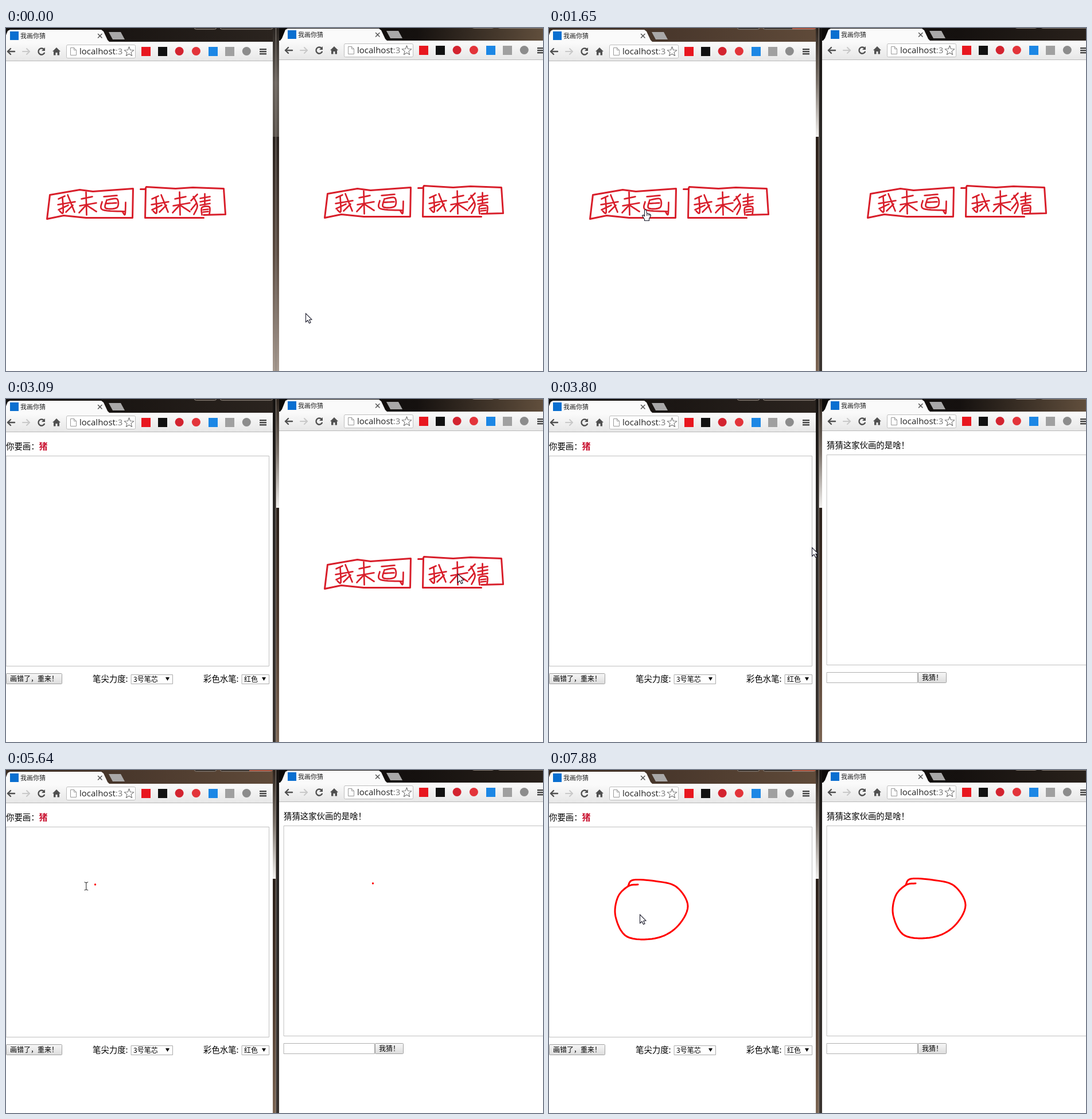
Animation, 936 px wide and 599 px high, one loop 8000 ms. Source, as an HTML page with a canvas:

```html
<!DOCTYPE html>
<html lang="zh">
<head>
<meta charset="utf-8">
<style>
html, body { margin: 0; width: 100%; height: 100%; overflow: hidden; background: #fff; }
canvas { display: block; }
</style>
</head>
<body>
<canvas id="stage" width="936" height="599"></canvas>
<script>
const ctx = document.getElementById('stage').getContext('2d');
const CJK = '"Noto Sans CJK SC", "Noto Sans CJK", sans-serif';
const SANS = '"Open Sans", "Noto Sans", sans-serif';
const LOOP = 8000, STEP = 137;
const INK = '#505050', PALE = '#c9c9c9', PEN = '#d81e2a';

// Basic shapes

function rect(x, y, w, h, fill) { ctx.fillStyle = fill; ctx.fillRect(x, y, w, h); }

function disc(x, y, r, fill) {
  ctx.beginPath(); ctx.arc(x, y, r, 0, 7);
  ctx.fillStyle = fill; ctx.fill();
}

function box(x, y, w, h, fill, stroke, r = 0) {
  ctx.beginPath(); ctx.roundRect(x + .5, y + .5, w, h, r);
  ctx.fillStyle = fill; ctx.fill();
  ctx.strokeStyle = stroke; ctx.lineWidth = 1; ctx.stroke();
}

function trace(points) {
  ctx.beginPath();
  points.forEach(([x, y]) => ctx.lineTo(x, y));
}

function poly(points, fill) { trace(points); ctx.fillStyle = fill; ctx.fill(); }

function line(points, color, width) {
  trace(points);
  ctx.strokeStyle = color; ctx.lineWidth = width;
  ctx.lineCap = ctx.lineJoin = 'round';
  ctx.stroke();
}

function text(s, x, y, size = 14.4, color = '#000', weight = '', family = CJK) {
  ctx.font = `${weight} ${size}px ${family}`;
  ctx.fillStyle = color;
  ctx.fillText(s, x, y);
}

function fade(x0, y0, x1, y1, ...colors) {
  const g = ctx.createLinearGradient(x0, y0, x1, y1);
  colors.forEach((c, i) => g.addColorStop(i / (colors.length - 1), c));
  return g;
}

// Curves

const points = s => s.split(' ').map(p => p.split(',').map(Number));
const dist = (a, b) => Math.hypot(b[0] - a[0], b[1] - a[1]);

// Catmull-Rom curve through a few key points.
function spline(keys, n = 8) {
  const at = i => keys[Math.max(0, Math.min(keys.length - 1, i))];
  const out = [keys[0]];
  for (let i = 0; i < keys.length - 1; i++) {
    for (let k = 1; k <= n; k++) {
      const u = k / n;
      out.push([0, 1].map(c => {
        const [a, b, d, e] = [-1, 0, 1, 2].map(j => at(i + j)[c]);
        return b + u * ((d - a) + u * ((2 * a - 5 * b + 4 * d - e) + u * (3 * b - a - 3 * d + e))) / 2;
      }));
    }
  }
  return out;
}

function partial(path, length) {
  const out = [path[0]];
  for (let i = 1; i < path.length && length > 0; i++) {
    const a = path[i - 1], b = path[i], d = dist(a, b), f = Math.min(1, length / d);
    out.push([a[0] + (b[0] - a[0]) * f, a[1] + (b[1] - a[1]) * f]);
    length -= d;
  }
  return out;
}

// Hand-lettered buttons: strokes separated by "|".
const strokes = s => s.split('|').map(k => spline(points(k)));
const outlines = [
  '76,291 71,333 100,327 139,331 220,331 221,280 151,285 128,282 76,291',
  '234,281 242,281 244,277 295,280 325,278 379,280 382,325 344,326',
  '344,331 242,331 243,280'
].map(points);
const wo = strokes('102,293 91,298|90,308 120,303|98,296 99,322 93,319|91,317 108,309|107,291 119,321|116,309 104,321');
const lai = strokes('131,298 150,294|128,310 157,305|139,286 140,326|139,309 127,322|140,309 157,320');
const hua = strokes('170,294 193,292|175,300 173,314 193,313 193,298 175,300|174,306 192,305|' +
  '167,303 168,317 207,320|208,304 207,325 203,321');
const cai = strokes('333,290 322,301|326,294 333,310 327,325|331,306 322,317|346,289 346,308|341,326 341,313 354,312 354,325');
for (const y of [297, 303, 309]) cai.push([[338, y], [355, y - 3]]);
for (const y of [317, 321]) cai.push([[343, y], [352, y - 1]]);

function letters(glyphs, dx = 0) {
  ctx.save();
  ctx.translate(dx, 0);
  glyphs.forEach(g => g.forEach(s => line(s, PEN, 2.7)));
  ctx.restore();
}

// Motion

const circle = spline(points('155,200 138,203 120,222 116,256 136,291 185,294 222,275 242,238 222,204 185,194 147,192 138,202'));
const total = circle.reduce((sum, p, i) => i ? sum + dist(circle[i - 1], p) : 0, 0);
const TAIL = 48, LEAD = 16;

// Share of a move done at time t; it advances in steps, the first right at the start.
function progress(t, start, end) {
  if (t < start) return 0;
  const n = Math.round((end - start) / STEP);
  if (t >= end || !n) return 1;
  return (Math.floor((t - start) / (end - start) * n + 1e-6) + 1) / (n + 1);
}

function drawnLength(t) {
  const main = Math.max(0, (progress(t, 5640, 6650) * 8 - 1) / 7);
  return (total - TAIL) * main + TAIL * progress(t, 6770, 7040);
}

// Cursor moves: start, end, x, y, final shape.
const moves = [
  [130, 1090, 168, 317, 'hand'],
  [1770, 1770, 168, 317, 'arrow'],
  [2230, 2690, 766, 317, 'hand'],
  [2820, 3090, 787, 305, 'arrow'],
  [3370, 4360, 128, 212, 'arrow'],
  [4490, 4800, 154, 199, 'arrow'],
  [5640, 5640, 138, 202, 'beam'],
  [7180, 7720, 158, 256, 'arrow'],
  [7880, 7880, 158, 252, 'arrow']
];

function cursorAt(t) {
  if (t >= 5640 && t < 7180) return [...partial(circle, drawnLength(t) + LEAD).pop(), 'beam'];
  let x = 522, y = 498, shape = 'arrow';
  for (const [start, end, tx, ty, last] of moves) {
    if (t < start) break;
    const f = progress(t, start, end);
    x += (tx - x) * f;
    y += (ty - y) * f;
    shape = f === 1 ? last : 'arrow';
  }
  return [Math.round(x), Math.round(y), shape];
}

// Pages

function menuPage() {
  ctx.save();
  ctx.translate(.5, .5);
  outlines.forEach(o => line(o, PEN, 3));
  letters([wo, lai, hua]);
  letters([wo, lai], 163);
  letters([cai]);
  ctx.restore();
}

function button(x, w, label) {
  box(x, 479, w, 18, fade(0, 479, 0, 498, '#f7f7f7', '#dcdcdc'), '#a0a0a0', 1);
  text(label, x + 7, 493, 12);
}

function select(x, w, label) {
  box(x, 481, w, 16, '#fff', '#aaa');
  text(label, x + 4, 493.5, 12);
  poly([[x + w - 12, 486], [x + w - 5, 486], [x + w - 8.5, 492]], '#000');
}

function board(t) {
  box(0, 99, 458, 367, '#fff', '#c0c0c0');
  if (t < 5640) return;
  const path = partial(circle, drawnLength(t));
  if (path.length > 1) line(path, '#f00', 3);
  else disc(155.5, 200, 1.7, '#f00');
}

function drawPage(t) {
  text('你要画：', 0, 88);
  text('猪', 57.6, 88, 15, '#c8102e', 'bold');
  board(t);
  button(0, 97, '画错了，重来！');
  text('笔尖力度:', 151, 494);
  select(218, 72, '3号笔芯');
  text('彩色水笔:', 344, 494);
  select(411, 47, '红色');
}

function guessPage(t) {
  text('猜猜这家伙画的是啥！', 0, 88);
  board(t);
  box(0, 479, 158, 18, '#fff', '#b0b0b0');
  button(159, 49, '我猜！');
}

// Browser windows

function arrow(x, dir, color, width) {
  line([[x - dir * 5, 36], [x, 41], [x - dir * 5, 46]], color, width);
  line([[x, 41], [x - dir * 12, 41]], color, width);
}

function toolbar() {
  rect(-8, 24, 480, 33, fade(0, 24, 0, 57, '#fbfbfb', '#e7e7e7'));
  rect(-8, 57, 480, 1, '#b9b9b9');
  arrow(3, -1, INK, 2.4);
  arrow(41, 1, PALE, 2);
  ctx.beginPath(); ctx.arc(62, 41, 5.5, .5, 5.5);
  ctx.strokeStyle = INK; ctx.lineWidth = 2.4; ctx.stroke();
  poly([[68, 34], [68, 40], [62, 40]], INK);
  poly([[88, 34], [95, 41], [81, 41]], INK);
  rect(83, 41, 3.5, 6.5, INK);
  rect(89.5, 41, 3.5, 6.5, INK);
  rect(83, 41, 10, 2, INK);

  box(105, 29, 120, 23, '#fff', '#bebebe', 2);
  line(points('122.5,38.5 118.5,34.5 112.5,34.5 112.5,47.5 122.5,47.5 122.5,38.5 118.5,38.5 118.5,34.5'), '#999', 1);
  text('localhost', 128, 46, 15, '#222', '', SANS);
  text(':3', 128 + ctx.measureText('localhost').width, 46, 15, '#777', '', SANS);
  line(Array.from({ length: 11 }, (_, i) => {
    const a = i * Math.PI / 5 - Math.PI / 2, r = i % 2 ? 3.7 : 8.7;
    return [214.5 + r * Math.cos(a), 41.5 + r * Math.sin(a)];
  }), '#777', 1.1);

  ['#e8171f', '#111', '#d3232f', '#e3343a', '#1c87e5', '#a0a0a0', '#8c8c8c'].forEach((color, i) => {
    const x = 243.5 + i * 29.3;
    if ([2, 3, 6].includes(i)) disc(x, 40.5, 7.5, color);
    else rect(Math.round(x - 8), 33, 16, 16, color);
  });
  for (const y of [36, 40, 44]) rect(442, y, 12, 2.4, '#444');
}

function titleBar(active, right) {
  const colors = right ? ['#0d0b0a', '#15110f', active ? '#65523f' : '#2a221c']
    : active ? ['#3a2c22', '#4b392d', '#5f4a39'] : ['#12100f', '#1c1714', '#2b241f'];
  rect(-8, -1, 480, 26, fade(0, 0, 464, 0, ...colors));
  for (const [x, w] of [[328, 38], [373, 91]]) box(x, -5, w, 7, '#3a322c', '#8b8178', 3);
  if (active && !right) rect(424, 0, 40, 2, '#a9523c');
  poly(points('-7,25 -3,20 3,5 7,3 166,3 170,6 177,21 181,25'), '#fafafa');
  poly(points('179,7 200,7 207,20 186,20'), '#a9a8a8');
  rect(7, 6, 15, 15, '#0a6fd0');
  text('我画你猜', 25, 17.5, 11, '#222');
  line([[160.5, 10.5], [167, 17]], '#555', 1.5);
  line([[167, 10.5], [160.5, 17]], '#555', 1.5);
}

function browser(right, active, page, t) {
  ctx.save();
  ctx.beginPath();
  ctx.rect(right ? 476 : 0, 0, right ? 460 : 465, 599);
  ctx.clip();
  rect(0, 0, 936, 599, '#fff');
  if (right) ctx.translate(484, -2);
  titleBar(active, right);
  toolbar();
  page(t);
  ctx.restore();
}

// Glass edge of a window; light falls on the upper part of the focused one.
function edge(x, focus) {
  const [upper, lower] = {
    on: [['#2e251e', '#7d746c', '#f2f0ee'], ['#2b211b', '#4d3a2e', '#7c6654']],
    off: [['#161311', '#2c2927'], ['#2c2927', '#3a3430']],
    idle: [['#2a2521', '#6b645e', '#57504a'], ['#2b2420', '#5c4c42', '#a79a90']]
  }[focus];
  rect(x, 0, 5, 190, fade(0, 0, 0, 190, ...upper));
  rect(x, 190, 5, 409, fade(0, 190, 0, 599, ...lower));
}

function edges(left, right) {
  rect(465, 0, 11, 599, '#141110');
  edge(465, left);
  edge(471, right);
  rect(470, 0, 1, 599, '#8d857e');
}

function cursor(x, y, shape) {
  ctx.save();
  ctx.translate(x + .5, y + .5);
  if (shape === 'beam') {
    for (const s of [-1, 1]) line([[-3, 7 * s], [0, 6 * s], [3, 7 * s]], '#222', 1);
    line([[0, -6], [0, 6]], '#222', 1);
  } else {
    const hand = shape === 'hand';
    poly(points(hand
      ? '-1,0 1,0 2,6 8,8 9,10 6,16 6,19 -2,19 -2,17 -6,10 -4,9 -2,11 -2,1'
      : '0,0 0,15 3.5,12 6,17 8.5,16 6.3,11 10.5,10.5'), '#fff');
    ctx.closePath();
    ctx.strokeStyle = '#1c1c2c'; ctx.lineWidth = 1.1; ctx.stroke();
    if (hand) for (const k of [2, 4.5, 7]) line([[k, 7], [k, 10]], '#1c1c2c', .9);
  }
  ctx.restore();
}

function draw(t) {
  const rightActive = t < 1650 || (t >= 2960 && t < 5640);
  browser(false, !rightActive, t < 1770 ? menuPage : drawPage, t);
  browser(true, rightActive, t < 3240 ? menuPage : guessPage, t);
  if (t < 1650) edges('idle', 'idle');
  else edges(rightActive ? 'off' : 'on', rightActive ? 'on' : 'off');
  cursor(...cursorAt(t));
}

const begin = performance.now();
function tick() {
  draw((performance.now() - begin) % LOOP);
  requestAnimationFrame(tick);
}
tick();
</script>
</body>
</html>
```
